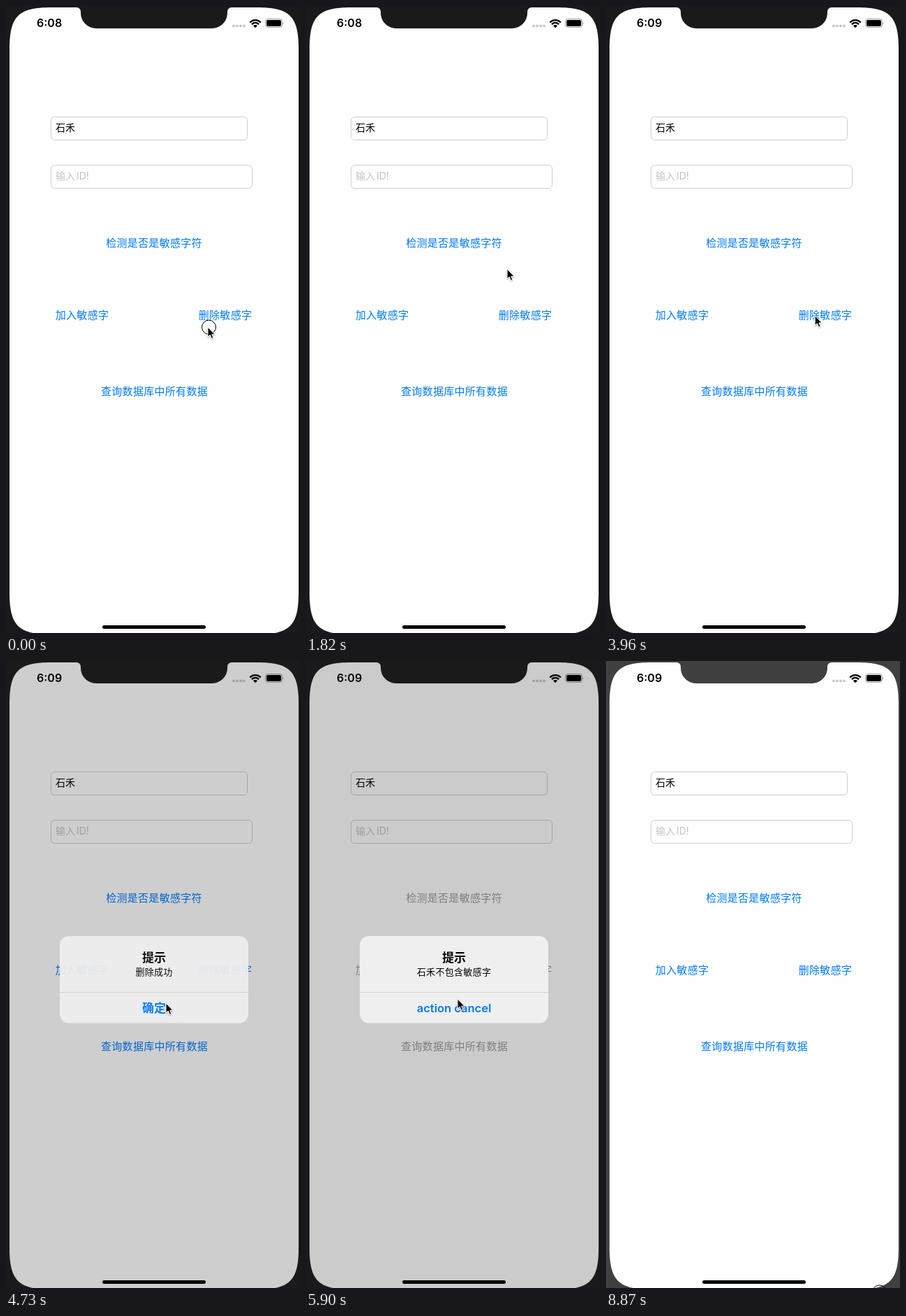
An HTML page that plays this animation: 421 by 896 pixels, repeating every 8970 ms.

```html
<!DOCTYPE html>
<html lang="zh-CN">
<head>
<meta charset="utf-8">
<title>敏感字检测</title>
<style>
  html, body { margin: 0; width: 100%; height: 100%; overflow: hidden; background: #1a1a1a; }
  svg { display: block; width: 421px; height: 896px; font-family: "Noto Sans CJK SC", "Noto Sans CJK", sans-serif; }
  .latin { font-family: Inter, Roboto, sans-serif; }
  .field rect { fill: none; stroke: #cdcdcd; }
  .field text { font-size: 14px; }
  .button { font-size: 15px; letter-spacing: .3px; text-anchor: middle; }
  #alert text { text-anchor: middle; }
  .strong { font-size: 17px; font-weight: 600; }
  #message { font-size: 13px; letter-spacing: .3px; }
  #action { fill: #007aff; }
  #action.latin { font-size: 16.5px; }
</style>
</head>
<body>
<svg viewBox="0 0 421 896">
  <defs>
    <clipPath id="screen">
      <path d="M5 62C5 14.5 17.5 2 65 2H359C406.5 2 419 14.5 419 62V838C419 885.5 406.5 898 359 898H65C17.5 898 5 885.5 5 838Z"/>
    </clipPath>
    <clipPath id="wedge"><path d="M357 31.2L343 17.2H371Z"/></clipPath>
    <filter id="shadow" x="-50%" y="-50%" width="200%" height="200%">
      <feDropShadow dx="0" dy="1" stdDeviation=".8" flood-opacity=".4"/>
    </filter>
  </defs>

  <rect class="bezel" width="421" height="896"/>
  <g clip-path="url(#screen)">
    <rect width="421" height="898" fill="#fefefe"/>
    <g class="field">
      <rect x="64.5" y="158.5" width="281" height="33" rx="5"/>
      <text x="71" y="179">石禾</text>
      <rect x="64.5" y="227.5" width="288" height="33" rx="5"/>
      <text x="71" y="248" fill="#c4c4c6">输入<tspan class="latin" x="101">ID!</tspan></text>
    </g>
    <text class="button" id="check" x="212" y="343.5">检测是否是敏感字符</text>
    <text class="button" id="add" x="109" y="446.5">加入敏感字</text>
    <text class="button" id="remove" x="314" y="446.5">删除敏感字</text>
    <text class="button" id="query" x="212.5" y="555.5">查询数据库中所有数据</text>

    <path d="M326 28.5H341.1" stroke="#c6c6c6" stroke-width="3.8" stroke-linecap="round" stroke-dasharray="0 5"/>
    <rect id="dim" width="421" height="898"/>

    <text class="latin" id="clock" x="44" y="30.3" font-size="16" font-weight="600"></text>
    <g clip-path="url(#wedge)" fill="none" stroke="#000" stroke-width="2.4">
      <circle cx="357" cy="30.5" r="10.4"/>
      <circle cx="357" cy="30.5" r="6.6"/>
      <circle cx="357" cy="30.5" r="1.7" stroke-width="3.4"/>
    </g>
    <rect x="371.5" y="18.5" width="24" height="12" rx="3.5" fill="none" stroke="#000" stroke-opacity=".38"/>
    <rect x="373" y="20" width="21" height="9" rx="2"/>
    <path d="M396.5 22.5q1.6 2 0 4z" fill-opacity=".45"/>
    <rect x="138" y="885" width="148" height="5" rx="2.5"/>

    <g id="alert">
      <rect x="77" y="393" width="270" height="124.5" rx="13" fill="#efefef"/>
      <path d="M77 473.5H347" stroke="#d3d3d3"/>
      <text class="strong" x="212" y="429.5">提示</text>
      <text id="message" x="212" y="449"></text>
      <text class="strong" id="action" x="212" y="502"></text>
    </g>
  </g>
  <path class="bezel" d="M101 0V2A6 6 0 0 1 107 8V10A22 22 0 0 0 129 32H295A22 22 0 0 0 317 10V8A6 6 0 0 1 323 2V0Z"/>

  <circle id="ring" r="10" fill="none" stroke="#000"/>
  <path id="cursor" filter="url(#shadow)" stroke="#fff" stroke-linejoin="round"
    d="M0 0V14L3.2 11L5.5 16.2L7.9 15.2L5.7 10.3H10Z"/>
</svg>

<script>
const LOOP = 8970, MINUTE = 2400, INACTIVE = 8870;
const TRAVEL = 550, SETTLE = 100, DWELL = 130, FADE = 330;
const $ = id => document.getElementById(id);
const set = (node, attrs) => Object.entries(attrs).forEach(([name, value]) => node.setAttribute(name, value));
const clamp = v => Math.min(1, Math.max(0, v));
const easeOut = p => 1 - (1 - p) ** 3;
const easeInOut = p => p < .5 ? 2 * p * p : 1 - 2 * (1 - p) ** 2;
const lerp = (a, b, p) => a + (b - a) * p;

const hover = (at, x, y) => ({ at, x, y });
const tap = (at, x, y, more) => ({ at, x, y, tap: true, ...more });
const press = (at, x, y, button, message, action) => tap(at, x, y, { button, message, action });

// A press with a message opens an alert, which the following tap closes.
const stops = [
  tap(0, 289, 459),
  press(560, 118, 441, 'add', '加入成功', '确定'),
  tap(1170, 224, 492),
  hover(1820, 288, 376),
  press(2090, 262, 341, 'check', '石禾包含敏感字', 'action cancel'),
  tap(3200, 222, 499),
  press(4100, 300, 442, 'remove', '删除成功', '确定'),
  tap(4610, 229, 489),
  press(5210, 248, 340, 'check', '石禾不包含敏感字', 'action cancel'),
  hover(5880, 217, 483),
  tap(6410, 218, 493),
  press(7440, 217, 544, 'query'),
  hover(7840, 221, 493),
  hover(8010, 357, 746),
  tap(INACTIVE, 390, 902)
];
const taps = stops.filter(stop => stop.tap);
const alerts = taps.filter(stop => stop.message).map(stop => ({
  ...stop, show: stop.at + 100, hide: taps[taps.indexOf(stop) + 1].at + 60
}));

function drawPointer(t) {
  const i = stops.findIndex(stop => stop.at > t);
  const to = stops.at(i), from = i > 0 ? stops[i - 1] : to;
  const end = to.at - (to.tap ? SETTLE : 0);
  const begin = Math.max(from.at + (from.tap ? DWELL : 0), end - TRAVEL);
  const p = easeInOut(clamp((t - begin) / (end - begin)));
  const x = lerp(from.x, to.x, p), y = lerp(from.y, to.y, p);
  const down = taps.some(({ at }) => t >= at && (t < at + 60 || at === INACTIVE));
  set($('cursor'), { transform: `translate(${x} ${y})` });
  set($('ring'), { transform: `translate(${x + 1.5} ${y})`, visibility: down ? 'visible' : 'hidden' });
}

// Returns how far the buttons have turned gray.
function drawAlert(t) {
  const current = alerts.find(({ show, hide }) => t >= show && t < hide + FADE);
  const shown = current ? easeOut(clamp((t - current.show) / 300)) : 0;
  const level = current ? shown * (1 - easeInOut(clamp((t - current.hide) / FADE))) : 0;
  if (current) {
    $('message').textContent = current.message;
    $('action').textContent = current.action;
    $('action').classList.toggle('latin', /^[a-z]/.test(current.action));
  }
  set($('alert'), {
    opacity: level,
    transform: `translate(212 455) scale(${1.15 - .15 * shown}) translate(-212 -455)`
  });
  set($('dim'), { opacity: .2 * level });
  return current && t < current.hide ? shown : 0;
}

function drawButtons(t, gray) {
  const color = `rgb(${[0, 122, 255].map(c => Math.round(lerp(c, 156, gray)))})`;
  for (const node of document.querySelectorAll('.button')) {
    const last = taps.findLast(({ button, at }) => button === node.id && at <= t);
    const released = last ? clamp((t - last.at - 90) / FADE) : 1;
    set(node, { fill: color, opacity: lerp(.22, 1, easeInOut(released)) });
  }
}

function draw(t) {
  drawButtons(t, drawAlert(t));
  drawPointer(t);
  $('clock').textContent = t < MINUTE ? '6:08' : '6:09';
  for (const node of document.querySelectorAll('.bezel')) set(node, { fill: t < INACTIVE ? '#1a1a1a' : '#404040' });
}

const start = performance.now();
function tick() {
  draw((performance.now() - start) % LOOP);
  requestAnimationFrame(tick);
}
tick();
</script>
</body>
</html>
```
